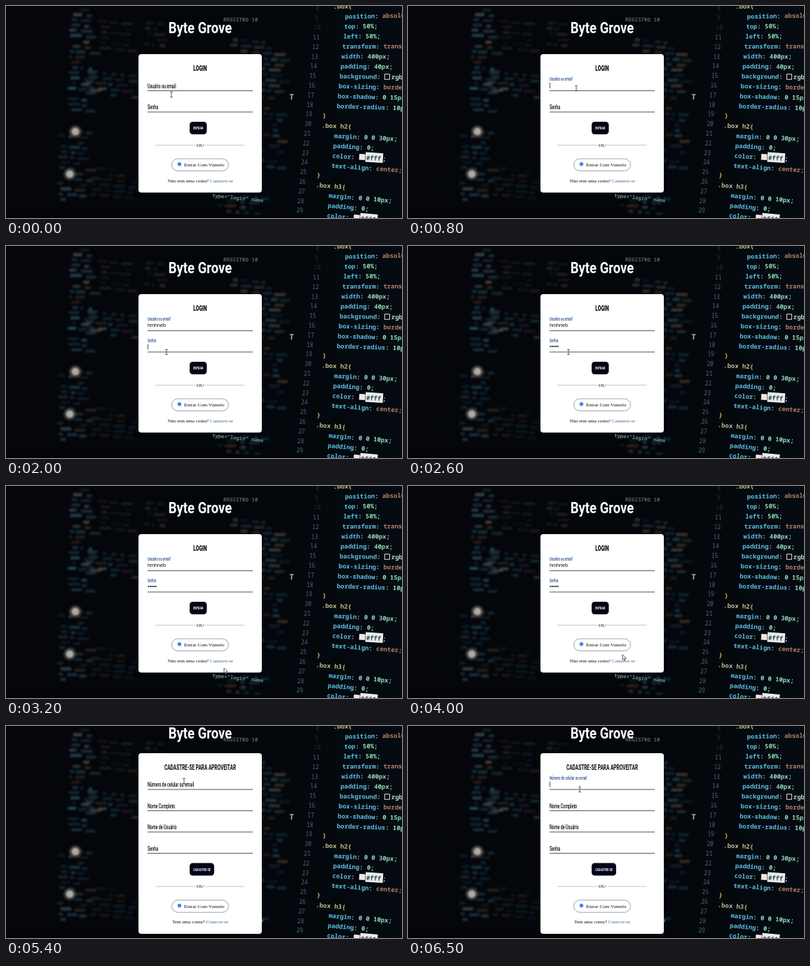
Write an HTML page with a canvas that moves like this. It is 565 by 304 pixels and loops after 6.6 s.

```html
<!DOCTYPE html>
<html lang="pt">
<head>
<meta charset="utf-8">
<title>Login</title>
<style>
html, body { margin: 0; width: 100%; height: 100%; overflow: hidden; background: #04070c; }
canvas { display: block; width: 565px; height: 304px; }
</style>
</head>
<body>
<canvas id="stage"></canvas>
<script>
const W = 565, H = 304, LOOP = 6600, STEP = 100;
const DPR = window.devicePixelRatio || 1;
const SANS = 'Roboto, "Open Sans", sans-serif';
const SERIF = '"Liberation Serif", "Noto Serif", serif';
const ARIAL = '"Liberation Sans", Arial, sans-serif';
const MONO = '"Noto Sans Mono", "DejaVu Sans Mono", monospace';
const CONDENSED = 0.62;
const INK = '#0a0a14', BLUE = '#284d92', LINK = '#3c6899';
const BRAND = 'Byte Grove', PROVIDER = 'Vumelo', USER = 'hmhneb';

function prepare(canvas) {
  canvas.width = W * DPR;
  canvas.height = H * DPR;
  const c = canvas.getContext('2d');
  c.scale(DPR, DPR);
  return c;
}

const ctx = prepare(document.getElementById('stage'));
const backdrop = document.createElement('canvas');

function seeded(seed) {
  return () => (seed = (seed * 16807) % 2147483647) / 2147483647;
}

function glow(c, x, y, r, color) {
  const g = c.createRadialGradient(x, y, r * 0.3, x, y, r);
  g.addColorStop(0, color);
  g.addColorStop(1, 'transparent');
  c.fillStyle = g;
  c.fillRect(x - r, y - r, 2 * r, 2 * r);
}

// Blocks of out-of-focus code: x, y, width, rows, strength
const BLOCKS = [
  [88, 2, 32, 20, 0.5], [112, 92, 70, 5, 0.42], [72, 176, 42, 14, 0.42],
  [195, 22, 26, 5, 0.28], [318, 46, 76, 10, 0.42], [352, 128, 36, 14, 0.36],
  [300, 268, 66, 4, 0.35], [130, 20, 50, 6, 0.2], [118, 230, 60, 6, 0.18]
];

function drawBlur(c) {
  const rnd = seeded(4711);
  const tints = ['#2b5570', '#34657d', '#234862', '#74523c', '#5c6a72'];
  c.save();
  c.filter = 'blur(1.4px)';
  for (const [x0, y0, width, rows, strength] of BLOCKS) {
    for (let row = 0; row < rows; row++) {
      let x = x0 + rnd() * 8;
      const y = y0 + row * 7.6;
      while (x < x0 + width) {
        const w = 5 + rnd() * 12;
        c.globalAlpha = strength * (0.5 + rnd());
        c.fillStyle = tints[Math.floor(rnd() * tints.length)];
        if (rnd() < 0.8) c.fillRect(x, y + (x - x0) * 0.1, w, 4);
        x += w + 2 + rnd() * 5;
      }
    }
  }
  c.restore();
  glow(c, 99, 180, 12, 'rgba(205,196,186,.85)');
  glow(c, 91, 241, 12, 'rgba(205,198,192,.85)');
  c.save();
  c.filter = 'blur(.7px)';
  const faint = [
    ['REGISTRO 10', 310, 22, '#56646c', 7.5],
    ['type="login" name', 294, 274, '#65949a', 7.2],
    ['T', 404, 134, '#a5b4ba', 11]
  ];
  for (const [s, x, y, color, size] of faint) {
    c.save();
    c.translate(x, y);
    c.rotate(y / 2700);
    c.font = `700 ${size}px ${MONO}`;
    c.fillStyle = color;
    c.fillText(s, 0, 0);
    c.restore();
  }
  c.restore();
}

const RULES = [
  '.box{', 'position: absolute;', 'top: 50%;', 'left: 50%;',
  'transform: translate', 'width: 400px;', 'padding: 40px;',
  'background: @rgba(', 'box-sizing: border', 'box-shadow: 0 15px',
  'border-radius: 10px', '}', '.box h2{', 'margin: 0 0 30px;',
  'padding: 0;', 'color: #fff;', 'text-align: center;', '}',
  '.box h3{', 'margin: 0 0 10px;', 'padding: 0;', 'color: #fff;'
];
const KEYWORD = /^(absolute|translate|border|center)/;

function drawRule(c, rule, i) {
  const inner = rule.includes(':');
  let x = 0;
  const put = (s, color) => {
    c.fillStyle = color;
    c.fillText(s, x, 3);
    x += c.measureText(s).width;
  };
  c.save();
  c.translate(467 - i * 1.39 + (inner ? 18 + i * 0.1 : 0), 1 + i * 14.2 + (inner ? i * 0.05 : 0));
  c.rotate(-0.025 + i * 0.0057);
  c.font = `600 8.9px ${MONO}`;
  if (!inner) {
    put(rule.replace(/[{}]/, ''), '#c3b791');
    put(rule.slice(-1), '#e0bd4c');
  } else {
    const [prop, value] = rule.split(': ');
    put(prop, '#5cbfe2');
    put(': ', '#a9c4cd');
    if (value[0] === '@') {
      c.strokeStyle = '#dfe6e8';
      c.strokeRect(x + 0.5, -4, 7, 7.5);
      x += 10;
      put(value.slice(1), '#b9d6cc');
    } else if (value[0] === '#') {
      c.fillStyle = '#f0e6e0';
      c.fillRect(x + 1, -5, 8.5, 8.5);
      x += 11;
      c.fillStyle = '#e6ebec';
      c.fillRect(x - 1, -8, 25, 14);
      put('#fff', '#36444c');
      x += 2;
      put(';', '#b9d6cc');
    } else put(value, KEYWORD.test(value) ? '#b0806a' : '#93d9bd');
  }
  c.restore();
}

function drawBackdrop() {
  const c = prepare(backdrop);
  const g = c.createLinearGradient(0, 0, W, 0);
  g.addColorStop(0, '#04060a');
  g.addColorStop(0.6, '#03060a');
  g.addColorStop(1, '#050b11');
  c.fillStyle = g;
  c.fillRect(0, 0, W, H);
  drawBlur(c);
  RULES.forEach((rule, i) => {
    drawRule(c, rule, i);
    c.font = `8px ${MONO}`;
    c.fillStyle = i < 3 ? '#1c2e38' : '#4d6773';
    c.fillText(i + 8, 442 - i * 1.32, 6.5 + i * 13.8);
  });
  c.fillStyle = 'rgba(0,0,0,.6)';
  c.fillRect(0, 300, 430, 4);
}

function text(s, x, y, font, color, align = 'left', narrow = 1) {
  ctx.save();
  ctx.translate(x, y);
  ctx.scale(narrow, 1);
  ctx.font = font;
  ctx.fillStyle = color;
  ctx.textAlign = align;
  ctx.fillText(s, 0, 0);
  ctx.restore();
}

const condensed = (s, x, y, size, color, align, weight = 700) =>
  text(s, x, y, `${weight} ${size}px ${SANS}`, color, align, CONDENSED);

function box(x, y, w, h, r, fill, stroke) {
  ctx.beginPath();
  ctx.roundRect(x, y, w, h, r);
  if (fill) { ctx.fillStyle = fill; ctx.fill(); }
  if (stroke) { ctx.strokeStyle = stroke; ctx.lineWidth = 1; ctx.stroke(); }
}

function rect(x, y, w, h, color) {
  ctx.fillStyle = color;
  ctx.fillRect(x, y, w, h);
}

// lift: 0 = label rests on the line, 1 = floated above it
function field(label, line, lift = 0, value = '', dots = 0, caret = false) {
  const size = 8.7 - 1.7 * lift;
  condensed(label, 202, line - 4.5 - 10.3 * lift, size, lift > 0.5 ? BLUE : INK, 'left', 500);
  rect(202, line - 1, 150, 1, '#55555c');
  if (value) text(value, 202, line - 6, `7.2px ${ARIAL}`, '#111');
  for (let i = 0; i < dots; i++) {
    ctx.beginPath();
    ctx.arc(203.3 + i * 2.6, line - 8.5, 1.05, 0, 7);
    ctx.fillStyle = '#111';
    ctx.fill();
  }
  if (caret) rect(202, line - 12, 0.8, 8, '#333');
}

function button(label, y, w, x = 262) {
  box(x, y, w, 18, 4.5, '#03031a');
  condensed(label, x + w / 2, y + 11.2, 6, '#fff', 'center');
}

function footer(top, question, link, x) {
  const serif = `7.1px ${SERIF}`;
  rect(213, top, 58, 0.8, '#bcbcc4');
  rect(283.5, top, 57, 0.8, '#bcbcc4');
  text('OU', 277, top + 2.7, serif, INK, 'center');
  box(236.5, top + 20, 81, 17.5, 8.75, '#fff', '#a2a2a8');
  ctx.beginPath();
  ctx.arc(247.5, top + 27.8, 2.7, 0, 7);
  ctx.fillStyle = '#4285f4';
  ctx.fill();
  text('Entrar Com ' + PROVIDER, 254, top + 31.3, serif, INK);
  text(question, x, top + 53.7, serif, INK);
  ctx.font = serif;
  text(link, x + ctx.measureText(question).width, top + 53.7, serif, LINK);
}

const clamp = v => Math.max(0, Math.min(1, v));
const ease = v => v * v * (3 - 2 * v);
const ramp = (t, from, span) => ease(clamp((t - from) / span));
const typed = (t, from, n) => Math.max(0, Math.min(n, Math.floor((t - from) / 100) + 1));
const blink = (t, from) => t >= from && (t - from) % 1000 < 600;

function login(t) {
  box(189, 69, 176, 198.5, 4, '#fff');
  condensed('LOGIN', 277, 93, 10.8, INK, 'center', 800);
  const name = USER.slice(0, typed(t, 1000, USER.length));
  const dots = typed(t, 2200, 5);
  field('Usuário ou email', 122, ramp(t, 500, 300), name, 0, !name && blink(t, 600));
  field('Senha', 152.5, ramp(t, 1700, 300), '', dots, !dots && blink(t, 1800));
  button('ENTRAR', 166, 24.5);
  footer(199, 'Não tem uma conta? ', 'Cadastre-se', 230.7);
}

function signup(t) {
  box(189, 39, 176, 259, 4, '#fff');
  condensed('CADASTRE-SE PARA APROVEITAR', 277, 62.5, 10.5, INK, 'center');
  field('Número de celular ou email', 91.5, ramp(t, 6100, 300), '', 0, blink(t, 6100));
  field('Nome Completo', 122);
  field('Nome de Usuário', 152.5);
  field('Senha', 183);
  button('CADASTRE-SE', 196.5, 35);
  footer(229.7, 'Tem uma conta? ', 'Conecte-se', 237);
}

// time, x, y
const PATH = [
  [0, 236, 127], [500, 240, 118], [1500, 240, 118], [1800, 229, 152],
  [2600, 229, 152], [3200, 313, 265], [3500, 308, 252], [3900, 308, 252],
  [4700, 309, 107], [5100, 306, 251], [5200, 306, 251], [5400, 254, 79],
  [6100, 245, 91], [6600, 245, 91]
];

function pointer(t) {
  const i = PATH.findIndex(p => p[0] > t);
  const [t0, x0, y0] = PATH[i - 1], [t1, x1, y1] = PATH[i];
  const k = ease((t - t0) / (t1 - t0));
  return [x0 + (x1 - x0) * k, y0 + (y1 - y0) * k];
}

function drawPointer(x, y, beam) {
  ctx.save();
  ctx.translate(x, y);
  ctx.lineWidth = 0.8;
  ctx.strokeStyle = '#333';
  ctx.beginPath();
  if (beam) {
    for (const s of [-1, 1]) {
      ctx.moveTo(-1.8, 3.6 * s);
      ctx.lineTo(1.8, 3.6 * s);
    }
    ctx.moveTo(0, -3.6);
    ctx.lineTo(0, 3.6);
  } else {
    ctx.translate(-2, -4);
    const tip = [[0, 0], [0, 7.4], [1.7, 5.9], [2.9, 8.6], [4, 8.1], [2.9, 5.4], [5.2, 5.3]];
    tip.forEach(p => ctx.lineTo(...p));
    ctx.closePath();
    ctx.fillStyle = '#fff';
    ctx.fill();
  }
  ctx.stroke();
  ctx.restore();
}

function draw(t) {
  const joined = t >= 5300;
  ctx.drawImage(backdrop, 0, 0, W, H);
  text(BRAND, 277, joined ? 18 : 39, `700 22px ${SANS}`, '#fff', 'center', 0.84);
  (joined ? signup : login)(t);
  const [x, y] = pointer(t);
  const beam = t < 2800 || t >= 5400;
  drawPointer(x, y, beam);
}

function frame(now) {
  draw(Math.floor((now % LOOP) / STEP) * STEP);
  requestAnimationFrame(frame);
}

drawBackdrop();
requestAnimationFrame(frame);
</script>
</body>
</html>
```
